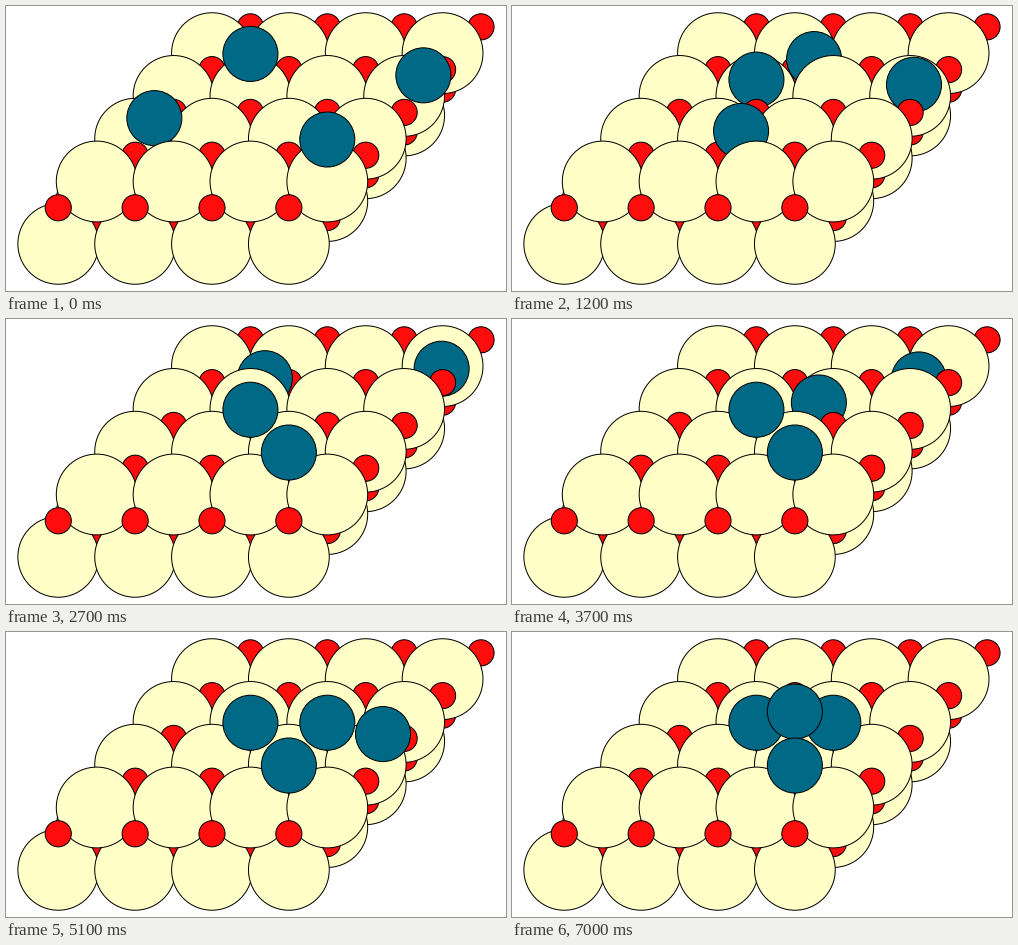
Write a matplotlib script that moves like this. It is 500 px wide and 285 px high and loops after 7100 ms.

```python
import numpy as np
import matplotlib.pyplot as plt
from matplotlib.animation import FuncAnimation
from matplotlib.patches import Circle

W, H, DPI = 500, 285, 100
FRAMES, INTERVAL = 71, 100
HOP = 20                          # frames per hop

# Everything scales with the unit so the slab fills the stage width
UNIT = 19.8
CREAM = ("#ffffc7", 2.04 * UNIT)
RED = ("#ff0d0d", 0.66 * UNIT)
TEAL = ("#006985", 1.39 * UNIT)

A = 3.882 * UNIT                  # in-plane spacing
ROW = A * np.sqrt(3) / 2          # distance between rows
SHIFT = ROW / 3                   # stacking offset along y
GAP = A * np.sqrt(2 / 3)          # distance between cream layers
RISE = GAP / 4                    # height of red above or below cream
LIFT = 1.035 * UNIT               # height of resting teal above red
TILT = np.radians(50)
ORIGIN = (90.7, 175.5)            # front left atom of the upper cream layer


def project(x, y, z):
    """Screen x, screen y and depth (larger is nearer)."""
    return (ORIGIN[0] + x,
            ORIGIN[1] - y * np.cos(TILT) - z * np.sin(TILT),
            z * np.cos(TILT) - y * np.sin(TILT))


fig = plt.figure(figsize=(W / DPI, H / DPI), dpi=DPI, facecolor="white")
ax = fig.add_axes([0, 0, 1, 1])
ax.set_xlim(0, W)
ax.set_ylim(H, 0)
ax.axis("off")


def ball(kind, x, y, depth):
    color, radius = kind
    return ax.add_patch(Circle((x, y), radius, facecolor=color,
                               edgecolor="black", linewidth=72 / DPI,
                               zorder=depth))


def sheet(kind, stack, z):
    """A 4 by 4 sheet of atoms, moved by whole stacking offsets."""
    for j in range(4):
        for i in range(4):
            x = A * (i + (j + stack) / 2)
            ball(kind, *project(x, ROW * j + SHIFT * stack, z))


sheet(CREAM, -1, -GAP)
sheet(RED, 0, RISE - GAP)
sheet(RED, -1, -RISE)
sheet(CREAM, 0, 0)
sheet(RED, 1, RISE)


def site(x, row, lift=1):
    """A teal position in lattice units, measured from the top red sheet."""
    return project(x * A, SHIFT + row * ROW, RISE + lift * LIFT)


# One stop per hop; the last hop is cut to fit the loop
PATHS = [
    [site(2, 2), site(2, 1)],
    [site(0.75, 0.5), site(2.5, 0)],
    [site(3, 0), site(4.75, 2.5, 0), site(4, 2, 0), site(3.5, 0),
     site(2.5, 2 / 3, 2.62)],
    [site(4.25, 1.5), site(1.75, 2.5, 0), site(3, 1)],
]
movers = [ball(TEAL, *path[0]) for path in PATHS]


def update(frame):
    for patch, path in zip(movers, PATHS):
        times = np.minimum(HOP * np.arange(len(path)), FRAMES - 1)
        x, y, depth = (np.interp(frame, times, c) for c in zip(*path))
        patch.center = (x, y)
        patch.set_zorder(depth)
    return movers


anim = FuncAnimation(fig, update, frames=FRAMES, interval=INTERVAL,
                     repeat=True, repeat_delay=0)
plt.show()
```
